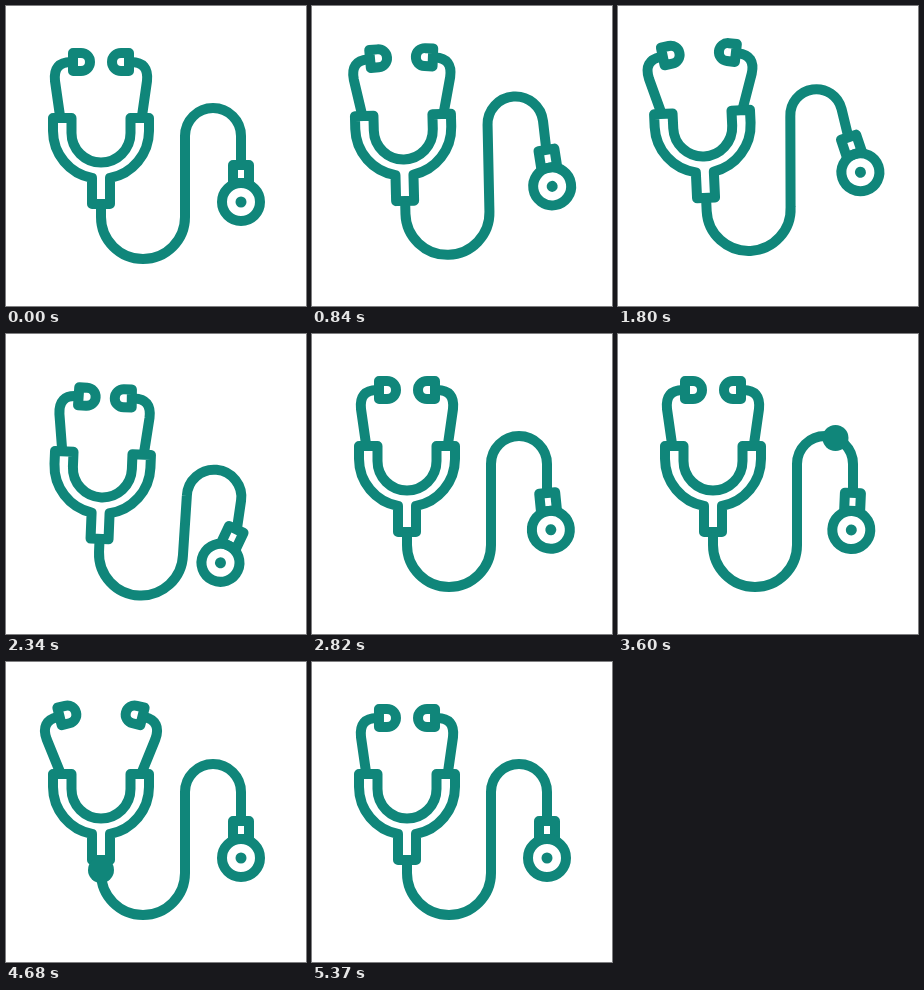
An HTML page that plays this animation: 300 by 300 pixels, repeating every 5.4 s.

```html
<!DOCTYPE html>
<html lang="en">
<head>
<meta charset="utf-8">
<title>Stethoscope</title>
<style>
  html, body { margin: 0; width: 100%; height: 100%; overflow: hidden; background: #fff; }
  svg { display: block; width: 100vw; height: 100vh; }
  .line { fill: none; stroke: #10867a; stroke-width: 10; stroke-linecap: round; stroke-linejoin: round; }
  .dot { fill: #10867a; stroke: none; }
</style>
</head>
<body>
<svg viewBox="0 0 300 300">
  <defs>
    <g id="arm">
      <path d="M54 110 L49 75 Q47 56 65 56"/>
      <path d="M67 47 H75 A9 9 0 0 1 75 65 H67 Z"/>
    </g>
  </defs>
  <g id="body" class="line">
    <use id="left" href="#arm"/>
    <g transform="matrix(-1 0 0 1 190 0)"><use id="right" href="#arm"/></g>
    <path d="M47 112 H65.5 V127 A29.5 29.5 0 0 0 124.5 127 V112 H143 V125
             A48 48 0 0 1 104 172 V198 H86 V172 A48 48 0 0 1 47 125 Z"/>
    <path id="cable"/>
    <g id="chest">
      <path d="M-8 2 H8 V20 H-8 Z"/>
      <circle cy="39" r="19"/>
      <circle class="dot" cy="39" r="5.5"/>
    </g>
    <circle id="pulse" class="dot"/>
  </g>
</svg>
<script>
const LOOP = 5400;
const $ = id => document.getElementById(id);
const [body, left, right, cable, chest, pulse] =
  ['body', 'left', 'right', 'cable', 'chest', 'pulse'].map($);

// Monotone cubic curve through [time, value] keys, at rest on every extreme.
function track(keys) {
  const slope = i => (keys[i + 1][1] - keys[i][1]) / (keys[i + 1][0] - keys[i][0]);
  const tangents = keys.map((_, i) => {
    if (i === 0 || i === keys.length - 1) return 0;
    const a = slope(i - 1), b = slope(i);
    return a * b <= 0 ? 0 : 2 * a * b / (a + b);
  });
  return t => {
    if (t <= keys[0][0]) return keys[0][1];
    const i = keys.findIndex(k => k[0] > t) - 1;
    if (i < 0) return keys[keys.length - 1][1];
    const [t0, v0] = keys[i], [t1, v1] = keys[i + 1];
    const d = t1 - t0, u = (t - t0) / d, w = 1 - u;
    return v0 * w * w * (1 + 2 * u) + v1 * u * u * (3 - 2 * u)
      + d * u * w * (tangents[i] * w - tangents[i + 1] * u);
  };
}

// Shared beats of the jump: rest, top, falling, lowest, rising, rest.
const beats = [700, 1150, 1800, 2140, 2340, 2620];
const jump = (...values) => beats.map((t, i) => [t, values[i]]);

const shiftX = track(jump(0, -17.5, -11, 3, 2, 0));
const shiftY = track(jump(0, -13.2, -6, 14, 7, 0));
const tilt = track(jump(0, -6.3, -2.7, 3, 2.3, 0));
const loopDrop = track(jump(0, -25, -9.5, 29, 21.5, 0));
const loopBend = track(jump(0, 22, 11, -4, -6, 0));
const loopSqueeze = track(jump(0, 2, 4, 2, 1.5, 0));
const swing = track([...jump(0, -32, -16, 12, 23, 4),
  [2900, -7], [3500, 3], [3950, -1], [4250, 0]]);
const spread = track([...jump(0, 15.5, 9, -2, -1.5, 0),
  [4260, 0], [4760, 15], [5130, 3], [5390, 0]]);
const travel = track([[3220, 0], [3600, 60], [4110, 278], [4500, 331]]);
const pulseSize = track([[3200, 0], [3340, 13], [4680, 13], [4860, 0]]);

function cableEnd(drop, bend, squeeze) {
  const a = bend * Math.PI / 180, r = 28 - squeeze / 2, tail = 27;
  const x = 235 - r + r * Math.cos(a), y = 130 + drop - r * Math.sin(a);
  const end = [x + tail * Math.sin(a), y + tail * Math.cos(a)];
  cable.setAttribute('d', `M95 203 V211 A42 42 0 0 0 179 211 L${179 + squeeze} ${130 + drop}
    A${r} ${r} 0 ${bend < 0 ? 1 : 0} 1 ${x} ${y} L${end}`);
  return end;
}

function draw(t) {
  body.setAttribute('transform',
    `translate(${shiftX(t)} ${shiftY(t)}) rotate(${tilt(t)} 95 112)`);
  for (const arm of [left, right]) {
    arm.setAttribute('transform', `rotate(${-spread(t)} 54 110)`);
  }
  const end = cableEnd(loopDrop(t), loopBend(t), loopSqueeze(t));
  chest.setAttribute('transform', `translate(${end}) rotate(${swing(t)})`);

  const spot = cable.getPointAtLength(cable.getTotalLength() - travel(t));
  pulse.setAttribute('cx', spot.x);
  pulse.setAttribute('cy', spot.y);
  pulse.setAttribute('r', pulseSize(t));
}

const start = performance.now();
function tick() {
  draw((performance.now() - start) % LOOP);
  requestAnimationFrame(tick);
}
tick();
</script>
</body>
</html>
```
